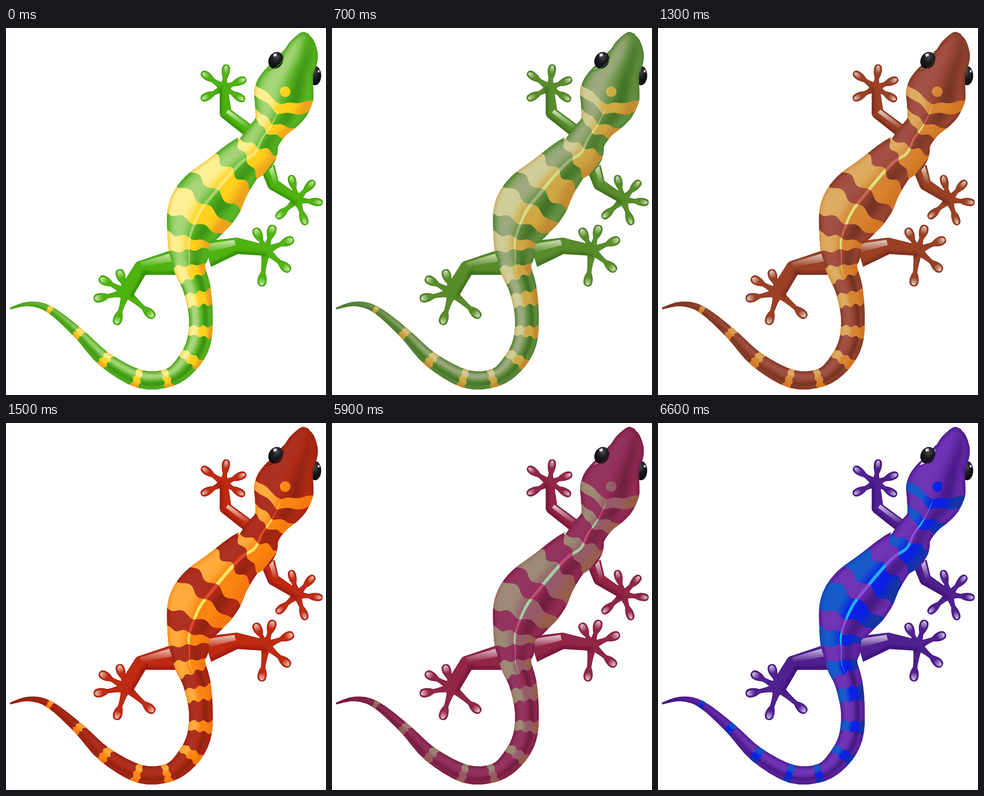
Animation of 698x802 px, one loop 8 s. Source, as an HTML page:

```html
<!DOCTYPE html>
<html lang="en">
<head>
<meta charset="utf-8">
<title>Gecko changing colour</title>
<style>
  html, body { margin: 0; width: 100%; height: 100%; overflow: hidden; background: #fff; }
  svg { display: block; width: 100%; height: 100%; }
  .wide { filter: url(#blurWide); }
  .fine { filter: url(#blurFine); }
  .line { fill: none; stroke-linecap: round; stroke-linejoin: round; }
  #limbRims { fill: var(--rim); stroke: var(--rim); stroke-width: 1.6; }
  #limbs { fill: var(--limb); }
</style>
</head>
<body>
<svg viewBox="0 0 698 802" id="stage">
  <defs>
    <filter id="blurWide" filterUnits="userSpaceOnUse" x="0" y="0" width="698" height="802"><feGaussianBlur stdDeviation="9"/></filter>
    <filter id="blurFine" filterUnits="userSpaceOnUse" x="0" y="0" width="698" height="802"><feGaussianBlur stdDeviation="3"/></filter>
    <linearGradient id="toeGloss">
      <stop offset="0" stop-color="var(--gloss)" stop-opacity="0"/>
      <stop offset="1" stop-color="var(--gloss)" stop-opacity="0.9"/>
    </linearGradient>
    <linearGradient id="legGloss" x2="0" y2="1">
      <stop offset="0" stop-color="var(--gloss)" stop-opacity="0.9"/>
      <stop offset="1" stop-color="var(--gloss)" stop-opacity="0"/>
    </linearGradient>
    <radialGradient id="eyeball" cx="0.45" cy="0.3" r="0.7">
      <stop offset="0" stop-color="#4a4a52"/>
      <stop offset="0.45" stop-color="#1d1d22"/>
      <stop offset="1" stop-color="#060609"/>
    </radialGradient>
    <clipPath id="inLimbs"></clipPath>
    <clipPath id="inBody"></clipPath>
    <clipPath id="inBands"></clipPath>
  </defs>

  <g id="limbRims"></g>
  <g id="limbs"></g>
  <g clip-path="url(#inLimbs)">
    <g id="limbShade" class="line fine" stroke="var(--rim)" stroke-width="6"></g>
  </g>
  <g id="legShine" fill="url(#legGloss)"></g>
  <g id="toeShine" fill="url(#toeGloss)"></g>

  <ellipse cx="674" cy="104" rx="13.5" ry="21" fill="url(#eyeball)"/>
  <rect x="680" y="92" width="4" height="5" fill="#ddd"/>

  <g clip-path="url(#inBody)">
    <g id="skin"></g>
    <g id="bands" clip-path="url(#inBands)"></g>
  </g>

  <path d="M606 56Q608 82 570 94Q574 84 590 72Z" fill="var(--lid)"/>
  <ellipse cx="588.5" cy="70.5" rx="15.5" ry="19" transform="rotate(28 588.5 70.5)" fill="url(#eyeball)"/>
  <path d="M606 57Q608 82 570 94" class="line" stroke="var(--edge)" stroke-width="1.5"/>
  <path d="M583 57L590 55L591 61L584 63Z" fill="#ddd"/>
</svg>
<script>
const stage = document.getElementById('stage');
const fill = (id, markup) => document.getElementById(id).innerHTML = markup;
const polygon = pts => 'M' + pts.map(p => p.map(n => n.toFixed(1))).join('L') + 'Z';
const path = (d, attrs = '') => `<path d="${d}" ${attrs}/>`;

// Midline from snout to tail tip: x, y, half width.
const midline = [
  [656, 11, 5], [653, 18, 16], [648, 39, 31], [642, 63, 39], [631, 84, 43], [617, 115, 58],
  [608, 139, 65], [600, 167, 62], [590, 191, 52], [576, 217, 38], [558, 242, 40], [543, 273, 48],
  [514, 293, 50], [482, 327, 58], [454, 361, 70], [427, 395, 72], [410, 430, 63], [399, 466, 47],
  [400, 497, 42], [401, 526, 34], [416, 568, 30], [425, 630, 26], [420, 688, 26], [395, 733, 24],
  [356, 764, 20], [292, 767, 20], [216, 725, 17], [158, 667, 12], [95, 615, 8], [50, 603, 5], [9, 613, 2]
];
const last = midline.length - 1;
const clamp = (n, lo, hi) => Math.max(lo, Math.min(hi, n));

// Catmull-Rom value [x, y, half width] at station u.
function spline(u) {
  u = clamp(u, 0, last);
  const i = Math.min(Math.floor(u), last - 1), f = u - i;
  const [a, b, c, d] = [-1, 0, 1, 2].map(k => midline[clamp(i + k, 0, last)]);
  return a.map((_, k) => b[k] + f / 2 * (c[k] - a[k] +
    f * (2 * a[k] - 5 * b[k] + 4 * c[k] - d[k] + f * (3 * (b[k] - c[k]) + d[k] - a[k]))));
}

// Body coordinates: u runs along the midline, v across it from -1 to 1.
function place(u, v) {
  const [x, y, w] = spline(u), p = spline(u - .05), q = spline(u + .05);
  const dx = q[0] - p[0], dy = q[1] - p[1], n = Math.hypot(dx, dy);
  return [x + v * w * dy / n, y - v * w * dx / n];
}

function ribbon(from, to, left, right) {
  const us = Array.from({ length: 121 }, (_, i) => from + (to - from) * i / 120);
  return polygon([...us.map(u => place(u, left(u))), ...us.reverse().map(u => place(u, right(u)))]);
}
const strip = (from, to, left, right) => ribbon(from, to, () => left, () => right);

// Bands bend back at the middle on the head; their edges are wavy.
function band([u, half]) {
  const bend = Math.max(0, 10.5 - u) * .23;
  const vs = Array.from({ length: 45 }, (_, i) => (i - 22) / 20);
  const edge = side => vs.map(v => place(
    u + bend * (1 - Math.abs(v)) + side * half * (1 + .2 * Math.sin(8 * v + 5 * u + side)), v));
  return path(polygon([...edge(-1), ...edge(1).reverse()]));
}
const bandSpots = [
  [6.5, .42], [8.65, .4], [11.1, .55], [13.25, .62], [15.3, .58], [17.2, .42], [19.15, .37], [20.4, .23],
  [21.55, .19], [22.75, .2], [24.1, .13], [25.07, .1], [26, .11], [27, .1], [28, .08]
];

const outline = strip(0, last, -1, 1);
const spineHalf = u => 3.6 * Math.sin(Math.PI * (u - 6.9) / 12.9) / spline(u)[2];
const spine = ribbon(6.9, 19.8, u => -spineHalf(u), spineHalf);
const tone = (name, cls, d) => path(d, `class="${cls}" fill="var(--${name})"`);
const shading = (name, left, right) =>
  tone(name, 'wide', strip(1, 19, left, right)) + tone(name, 'fine', strip(18.5, last, left, right));
const contour = (name, width) =>
  path(outline, `class="line fine" stroke="var(--${name})" stroke-width="${width}" opacity="0.75"`);
const base = name => `<rect width="698" height="802" fill="var(--${name})"/>`;

fill('inBody', path(outline));
fill('inBands', bandSpots.map(band).join('') + '<circle cx="609" cy="139" r="11.5"/>');
fill('skin', base('skin') + shading('skinLight', -.85, -.15) + shading('skinDark', .2, .6) +
  contour('edge', 7) + tone('spine', '', spine));
fill('bands', base('band') + shading('bandLight', -1.1, -.2) + shading('bandDark', .6, 1.1) +
  contour('bandDark', 4) + tone('bandSpine', '', spine));

// Joints hold x, y, half width and run from hip to palm.
const legs = [
  { joints: [[526, 222, 13], [479, 186, 12], [475, 131, 8]], toe: 10,
    tips: [[427, 97], [481, 80], [523, 111], [520, 158], [426, 156]] },
  { joints: [[571, 305, 15], [583, 342, 12], [635, 375, 9]], toe: 10,
    tips: [[621, 322], [672, 334], [690, 382], [654, 430], [590, 415]] },
  { joints: [[368, 512, 27], [295, 524, 15], [262, 578, 16]], toe: 11.5,
    tips: [[204, 546], [246, 528], [192, 592], [240, 648], [323, 632]] },
  { joints: [[440, 494, 28], [502, 476, 17], [567, 486, 11]], toe: 11.5,
    tips: [[543, 438], [583, 431], [627, 461], [619, 531], [557, 564]] }
];

// Offsets two joints sideways by a share of their width; positive is upward on screen.
function sideLine(a, b, share) {
  const n = Math.hypot(b[0] - a[0], b[1] - a[1]);
  const nx = (b[1] - a[1]) / n, ny = (a[0] - b[0]) / n, up = ny < 0 ? share : -share;
  return [a, b].map(([x, y, w]) => [x + nx * w * up, y + ny * w * up]);
}
const between = (a, b, low, high) => polygon([...sideLine(a, b, low), ...sideLine(a, b, high).reverse()]);

let limbs = '', limbShade = '', legShine = '', toeShine = '';
for (const { joints, toe, tips } of legs) {
  const [hip, knee, palm] = joints;
  for (const [a, b] of [[hip, knee], [knee, palm]]) {
    limbs += path(between(a, b, -1, 1));
    limbShade += path(polygon(sideLine(a, b, -.9)));
  }
  for (const [x, y, w] of [knee, palm]) limbs += `<circle cx="${x}" cy="${y}" r="${w}"/>`;
  legShine += path(between(hip, knee, .1, .8));
  for (const [x, y] of tips) {
    const dx = x - palm[0], dy = y - palm[1], n = Math.hypot(dx, dy), neck = n - 30;
    const turn = `transform="translate(${palm[0]} ${palm[1]}) rotate(${Math.atan2(dy, dx) * 180 / Math.PI})"`;
    limbs += path(`M0 -10Q${neck * .6} -4 ${neck} -4C${n - 16} ${-toe} ${n} ${-toe} ${n} 0` +
      `C${n} ${toe} ${n - 16} ${toe} ${neck} 4Q${neck * .6} 4 0 10Z`, turn);
    toeShine += `<ellipse ${turn} cx="${n - 11}" cy="0" rx="9" ry="${toe - 5.5}"/>`;
  }
}
fill('limbRims', limbs);
fill('limbs', limbs);
fill('inLimbs', limbs);
fill('limbShade', limbShade);
fill('legShine', legShine);
fill('toeShine', toeShine);

// Green, red, violet.
const palette = {
  skin: ['5cb82a', 'b52c19', '6a2fae'],
  skinLight: ['a9d67a', 'ab3320', '7036b4'],
  skinDark: ['378f0a', '8c2011', '3f147e'],
  edge: ['3f9a16', '8a1c0a', '3b107a'],
  band: ['ffd11c', 'fa8612', '0b1fe6'],
  bandLight: ['fdf094', 'ffab3c', '155cc8'],
  bandDark: ['eca01a', 'f5780a', '12389a'],
  spine: ['a2d76c', 'de4a2e', '8c4dd8'],
  bandSpine: ['ffe672', 'ffe566', '20b0f2'],
  limb: ['4fb30f', 'bf2a12', '50208f'],
  rim: ['2f8506', '92140f', '350c6e'],
  gloss: ['dcf0c0', 'f6dcd4', 'e2d8f3'],
  lid: ['6fbb36', '90291a', 'e0d0f5']
};
const channels = hex => [0, 2, 4].map(i => parseInt(hex.slice(i, i + 2), 16));
const colours = Object.entries(palette).map(([name, list]) => [name, list.map(channels)]);

// Fades advance in steps of 100 ms.
const fade = (t, start, steps) => clamp(Math.floor((t - start) / 100) + 1, 0, steps) / steps;

// Violet lies at the bottom, red fades in and out above it, green fades out on top.
function draw(t) {
  const toRed = fade(t, 500, 11), toViolet = fade(t, 5500, 12);
  const green = 1 - toRed, red = toRed * toRed * (1 - toViolet);
  const weights = [green, red, 1 - green - red];
  for (const [name, list] of colours) {
    const rgb = [0, 1, 2].map(c => Math.round(list.reduce((sum, hue, i) => sum + hue[c] * weights[i], 0)));
    stage.style.setProperty('--' + name, `rgb(${rgb})`);
  }
}
const begin = performance.now();
(function tick() {
  draw((performance.now() - begin) % 8000);
  requestAnimationFrame(tick);
})();
</script>
</body>
</html>
```
